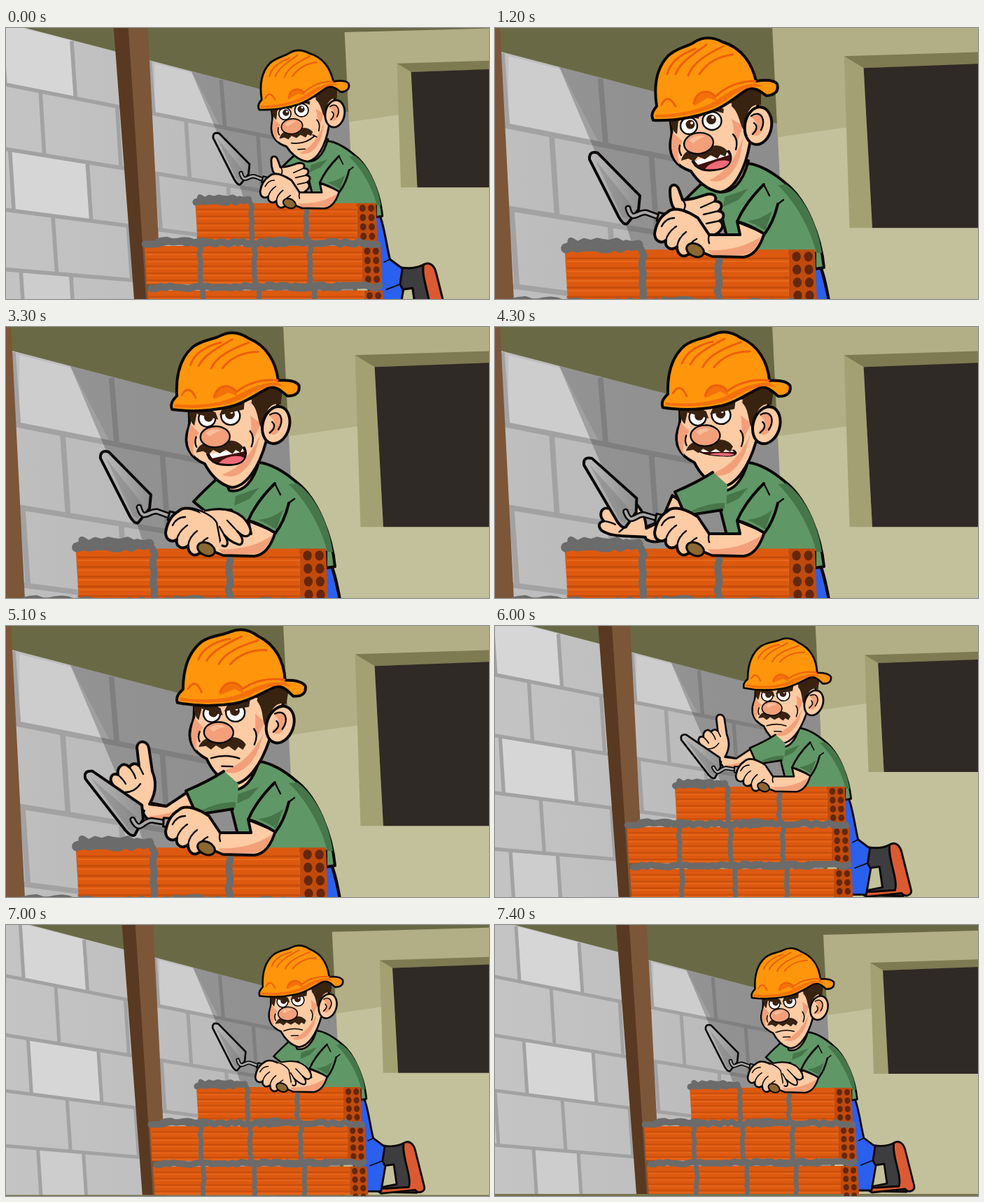
Write an HTML page that moves like this. It is 690 px wide and 388 px high and loops after 7500 ms.

```html
<!DOCTYPE html>
<html lang="en">
<head>
<meta charset="utf-8">
<title>Bricklayer</title>
<style>
html, body { margin: 0; width: 100%; height: 100%; overflow: hidden; background: #696a45; }
svg { display: block; width: 100vw; height: 100vh; }
.ink { stroke: #0b0807; stroke-width: 4; stroke-linejoin: round; stroke-linecap: round; }
.line { fill: none; stroke: #0b0807; stroke-width: 2.4; stroke-linecap: round; stroke-linejoin: round; }
.thin { stroke-width: 2.4; }
.skin { fill: #fdcba4; }
.tan { fill: #f3a07a; }
.shirt { fill: #609767; }
.fold { fill: #467649; }
.hair { fill: #382210; }
.mortar { fill: none; stroke: #6b6b6b; stroke-linecap: round; stroke-linejoin: round; }
</style>
</head>
<body>
<svg viewBox="0 0 690 388" preserveAspectRatio="none">
<defs>
  <linearGradient id="blocks"><stop stop-color="#c6c6c6"/><stop offset=".5" stop-color="#bfbfc0"/><stop offset="1" stop-color="#b4b4b5"/></linearGradient>
  <linearGradient id="steel"><stop stop-color="#bcbcbc"/><stop offset="1" stop-color="#8f8f8f"/></linearGradient>
</defs>
<g id="camera">
  <path fill="#696a45" d="M-100-100H900V500H-100z"/>

  <!-- block wall -->
  <path fill="url(#blocks)" d="M-60-23L480 118V420H-60z"/>
  <path fill="#d6d6d7" d="M31 2L120 25L126 97L36 80zM42 167L139 182L144 257L47 242z"/>
  <path fill="#cdcdce" d="M55 322L118 327L122 388H58zM226 54L274 66L310 135L226 118z"/>
  <path id="grout" fill="none" stroke="#a2a2a3" stroke-width="5"/>
  <path fill="#000" opacity=".22" d="M273 64L480 118V388H390L335 211z"/>

  <!-- front wall and window -->
  <path fill="#b2ae86" d="M469 14L800 5V400H488z"/>
  <path fill="#c3c19b" d="M475 129L537 120L800 90V400H488z"/>
  <path fill="#b2ae86" d="M537 50H800V118L537 120z"/>
  <path fill="#a3a074" d="M536 54L554 65L562 213H541z"/>
  <path fill="#7e7a51" d="M536 54L800 46V57L554 65z"/>
  <path fill="#2f2a25" d="M554 65L800 56V213H562z"/>
  <path fill="#77734f" d="M-60 385H800V430H-60z"/>

  <!-- post -->
  <path fill="#593922" d="M171-30L173 0L202 385H220L192 0L190-30z"/>
  <path fill="#7c5638" d="M190-30L216-30L217 0L231 277L236 385H217z"/>

  <!-- legs -->
  <g stroke="#0b0807" stroke-width="2.8" stroke-linejoin="round">
    <path fill="#3d3d40" d="M530 312C545 318 558 318 570 312L582 318L597 374L588 382L535 381L540 374L560 370L556 342L534 345z"/>
    <path fill="#dc5a32" d="M570 312C578 307 584 314 586 322L599 374C600 381 590 384 586 378L538 383C533 379 538 375 545 376L577 374C582 360 566 328 570 312z"/>
    <path fill="#2a60ee" d="M500 240L513 246C520 262 522 285 527 305L543 317L540 337L544 345L538 380H500z"/>
    <path fill="none" stroke-width="1.6" d="M527 305L519 309M540 337L522 344"/>
  </g>

  <g transform="translate(213.7 28) scale(.6462)">
    <!-- torso -->
    <path class="shirt ink" d="M312 207C298 221 282 234 268 250L285 264L322 262L337 322L457 322V345L470 343C466 300 445 245 415 222C395 205 378 196 362 194z"/>
    <path class="fold" d="M404 225C432 252 452 292 459 322H467C461 280 440 240 416 224zM328 242L362 230L348 246L326 256z"/>
    <path class="skin ink" d="M305 200L319 234C338 238 354 222 362 190z"/>

    <!-- head -->
    <g id="head">
      <path class="skin ink" d="M250 128C252 145 254 150 251 160C247 182 258 198 280 205C287 216 302 233 322 235C342 232 358 202 364 165L378 98L300 112z"/>
      <path class="tan" d="M254 150C250 168 252 186 264 196C259 182 262 168 268 162zM306 218C322 224 340 214 350 184L355 156C346 178 336 204 306 218zM338 130C342 145 340 152 346 164L354 140z"/>
      <path class="hair" d="M338 98L380 82L380 110C366 108 358 118 357 148C349 140 350 122 338 112zM250 130L262 132L260 152C254 148 251 140 250 130z"/>
      <ellipse class="skin ink" cx="376" cy="140" rx="19" ry="27" transform="rotate(10 376 140)"/>
      <path class="tan" d="M366 128C378 118 388 130 382 146C378 156 370 156 366 150C376 142 376 134 366 128z"/>
      <path class="line" d="M366 126C380 116 388 132 380 146M370 136Q378 142 368 152M340 152Q348 160 344 174M264 168Q262 176 266 182"/>
      <ellipse class="ink thin" fill="#fff" cx="277" cy="140" rx="12" ry="12"/>
      <ellipse class="ink thin" fill="#fff" cx="310" cy="133" rx="13.5" ry="13"/>
      <g fill="#3a2010"><circle cx="279" cy="138" r="6.5"/><circle cx="309" cy="131" r="7"/></g>
      <g fill="#fff"><circle cx="281" cy="136" r="2"/><circle cx="311" cy="128" r="2"/></g>
      <path id="calm" class="hair" d="M260 136Q270 124 291 130L292 125Q272 119 260 129zM295 124Q308 115 326 122L327 116Q308 108 294 118z"/>
      <path id="angry" class="hair" d="M260 124L288 130L293 140L262 135zM294 134L298 122L328 110L328 122z"/>
      <g id="talk">
        <path class="ink" style="stroke-width:2.6" fill="#40100d" d="M282 191Q310 190 334 176C341 187 336 199 322 202Q298 208 286 197z"/>
        <path fill="#ef6a78" d="M300 202C308 191 326 187 335 191C333 199 322 203 300 202z"/>
        <path fill="#fff" d="M285 190L332 178L334 182L290 196z"/>
      </g>
      <path id="smirk" class="line" d="M290 198Q316 202 336 184M332 182L340 186M303 211L317 210"/>
      <path id="frown" class="line" d="M286 203Q306 193 326 197M303 212L318 210"/>
      <path class="hair" d="M266 190C268 178 280 170 295 174C310 166 324 166 332 176L329 184L322 181L318 187L308 182L300 188L290 184L284 191L276 187z"/>
      <ellipse class="tan ink thin" cx="291" cy="165" rx="21" ry="15" transform="rotate(-8 291 165)"/>
      <path fill="#fbbd99" d="M277 161Q285 152 300 155Q291 158 283 165z"/>
      <path class="ink" fill="#ff950a" d="M226 132C222 124 226 118 231 112C226 80 232 56 247 40C260 28 275 27 285 20C298 12 312 13 325 20C352 28 367 50 373 76C385 74 398 74 403 80C406 90 400 96 388 97C380 92 374 85 362 87C345 97 328 114 305 121C280 129 250 133 226 132z"/>
      <path fill="#f4710a" d="M229 124C260 124 290 118 312 106C330 94 346 82 372 79L384 84C364 82 346 90 326 106C300 122 258 129 229 128zM284 112C286 96 298 86 312 94L317 104L304 100z"/>
      <path fill="none" stroke="#ee5f0c" stroke-width="3" stroke-linecap="round" d="M284 108C288 88 306 88 315 98C332 82 350 76 372 76M246 66C250 48 268 36 286 30M258 66C264 50 282 38 302 24M276 68C282 50 302 38 326 26M292 66C304 48 322 40 340 38M238 110Q246 92 258 112"/>
    </g>
  </g>

  <g id="bricks"></g>

  <!-- arms -->
  <g transform="translate(213.7 28) scale(.6462)">
    <g id="thumb">
      <path class="skin ink" d="M300 300C290 285 272 270 262 266C252 258 250 246 250 234C249 222 260 222 263 232L268 246C280 246 288 243 300 239C312 235 318 241 314 248C325 248 326 257 319 262C329 263 328 273 321 276C329 281 325 291 312 297z"/>
      <path class="line" d="M314 248L294 257M319 262L298 267M321 276L302 280M268 246Q274 252 270 260"/>
    </g>
    <g id="sleeve">
      <g id="raised">
        <path class="skin ink" d="M262 236L229 258L200 252L196 268C202 280 215 285 232 281L274 268z"/>
        <path class="skin ink" d="M228 258L205 255C214 240 216 225 209 208L204 174C201 163 188 163 187 174L190 200C186 196 180 196 176 202C168 193 158 202 160 213C151 209 146 219 153 228C160 240 178 250 196 264"/>
        <path class="line" d="M160 213Q168 220 171 226M176 202Q184 212 185 218M190 200L196 212M170 238Q184 238 192 226"/>
        <path class="tan" d="M203 272Q226 272 264 258L270 266Q222 286 203 272z"/>
      </g>
      <path class="shirt" d="M312 208L257 236L272 270L330 262L332 226z"/>
      <path class="fold" d="M276 266Q300 252 328 252V260z"/>
      <path class="ink" fill="none" d="M311 208C296 218 276 228 257 236L272 270L324 262"/>
    </g>
    <g id="trowel">
      <path fill="url(#steel)" class="ink" d="M135 188Q134 175 147 179L207 240L205 260L189 280Q184 283 177 271z"/>
      <path fill="#777" d="M143 188L196 255L189 274L182 271z" opacity=".4"/>
      <path class="line" d="M190 258C196 280 204 262 216 264L238 272" style="stroke-width:9"/>
      <path class="line" d="M190 258C196 280 204 262 216 264L238 272" style="stroke:#a7a7a7;stroke-width:4"/>
      <path class="ink" fill="#9b9b9b" style="stroke-width:3" d="M234 264L250 268L246 282L231 276z"/>
    </g>
    <path class="skin ink" d="M346 277L350 296L306 296L290 272C275 262 256 254 246 264C236 270 230 282 228 294C228 306 238 309 244 304C242 314 252 320 260 313C260 324 268 330 276 324L298 322L310 327L355 328C372 326 380 310 385 293z"/>
    <path class="tan" d="M304 318Q346 320 378 300L381 297C376 312 368 324 354 325H310z"/>
    <path class="line" d="M244 304Q247 292 259 284M260 313Q262 300 273 292M276 322Q276 308 288 302M238 284Q244 272 256 272M306 296Q304 302 306 308"/>
    <ellipse cx="286" cy="318" rx="13" ry="9" transform="rotate(25 286 318)" fill="#8b6831" class="ink" style="stroke-width:3"/>
    <g id="crossed">
      <path class="skin" d="M276 264C300 258 325 260 338 272C346 280 353 292 347 298C342 302 336 298 331 293C341 303 339 314 331 311C322 308 318 304 312 298C319 308 317 317 309 313L296 293z"/>
      <path class="line" style="stroke-width:3.2" d="M284 263C306 258 325 261 338 272C346 280 353 292 347 298C342 302 336 298 331 293C341 303 339 314 331 311C322 308 318 304 312 298C319 308 317 317 309 313"/>
      <path class="line" d="M331 293L316 277M312 298L305 286M262 259C280 262 296 271 301 280L306 306"/>
    </g>
    <path class="shirt ink" d="M384 224C368 240 354 258 346 277Q364 282 385 295Q398 278 404 252"/>
    <path class="fold" d="M362 276Q380 274 396 262L386 290Q372 281 362 277z"/>
    <path class="line" d="M404 252L412 246M384 224L392 240"/>
  </g>
</g>
</svg>
<script>
const $ = id => document.getElementById(id);

// Courses of the block wall: height at x = 0 and slope.
const courses = [[-7, .26], [74, .198], [158, .163], [237, .13], [315, .085], [393, .06]];
const courseY = (i, x) => courses[i][0] + courses[i][1] * x;
const joints = [[-62, 30, 120, 220, 311, 400], [-15, 80, 178, 266, 358], [-55, 41, 140, 229, 320],
  [0, 96, 192, 285], [-40, 55, 119, 210, 300]];
let grout = '';
joints.forEach((xs, i) => {
  if (i) grout += `M-60 ${courseY(i, -60)}L480 ${courseY(i, 480)}`;
  for (const x of xs) grout += `M${x} ${courseY(i, x) + (i ? 0 : 1)}L${x + 5} ${courseY(i + 1, x + 5)}`;
});
$('grout').setAttribute('d', grout);

let seed = 7;
const rand = () => (seed = seed * 16807 % 2147483647) / 2147483647;

// Uneven line of mortar.
function mortar(x1, y1, x2, y2, width, rough) {
  const n = Math.ceil(Math.hypot(x2 - x1, y2 - y1) / 6);
  let d = '';
  for (let i = 0; i <= n; i++) {
    const jx = x1 === x2 ? (rand() - .5) * rough : 0, jy = x1 === x2 ? 0 : (rand() - .5) * rough;
    d += `${i ? 'L' : 'M'}${x1 + (x2 - x1) * i / n + jx} ${y1 + (y2 - y1) * i / n + jy}`;
  }
  return `<path class="mortar" stroke-width="${width}" d="${d}"/>`;
}

function brickRow(left, right, top, bottom, seams) {
  const face = right - 24;
  let s = `<path fill="#dd590f" d="M${left} ${top}H${face}V${bottom}H${left + 3}z"/>`
    + `<path fill="#c04a0c" d="M${face} ${top}H${right}L${right + 2} ${bottom}H${face}z"/>`;
  for (let y = top + 8; y < bottom - 3; y += 9)
    s += `<path stroke="#c44d0c" stroke-width="1.6" d="M${left + 2} ${y}H${face}"/>`
      + `<path stroke="#ea6d20" stroke-width="1" d="M${left + 2} ${y + 3}H${face}"/>`;
  for (let i = 0; i < 4; i++)
    for (const x of [face + 7, face + 18])
      s += `<ellipse cx="${x + i * .4}" cy="${top + 6.5 + i * 12}" rx="4" ry="4.6" fill="#64270c"/>`;
  for (const x of seams) s += mortar(x, top, x, bottom, 6.5, 2.5);
  return s;
}
$('bricks').innerHTML =
  brickRow(278, 509, 233, 282, [350, 420]) + brickRow(213, 515, 288, 337, [284, 354, 425])
  + brickRow(217, 518, 345, 385, [288, 360, 430])
  + mortar(279, 231, 346, 230, 9, 4) + mortar(284, 227, 338, 227, 7, 4)
  + mortar(214, 284, 511, 284, 9, 4) + mortar(230, 280, 300, 281, 6, 4) + mortar(370, 280, 410, 280, 6, 4)
  + mortar(222, 341, 514, 340, 9, 4) + mortar(370, 338, 460, 338, 6, 4);

const ramp = (t, a, b) => Math.max(0, Math.min(1, (t - a) / (b - a)));
const show = (id, on) => $(id).style.display = on ? '' : 'none';
const place = (id, value) => $(id).setAttribute('transform', value);

function view(t) {
  if (t < 700) {
    const k = t / 1000 * .035;
    return [1.117 + k, -40.2 - 400 * k, -9.6 - 150 * k];
  }
  if (t < 5700) return [1.5475, -330.7, -43.3];
  const k = (7400 - t) / 1400;
  return [1 + .0525 * k, -35.9 * k, -15.3 * k];
}

function draw(t) {
  const [zoom, x, y] = view(t);
  place('camera', `translate(${x} ${y}) scale(${zoom})`);

  const raise = ramp(t, 4200, 4500) - ramp(t, 6200, 6500);
  const tilt = 5.5 * ramp(t, 2500, 2800) + 3.5 * raise;
  place('head', `translate(${tilt / 3} ${-tilt * .8}) rotate(${tilt} 330 225)`);
  place('trowel', `rotate(${-11 * raise} 285 315)`);
  place('raised', `rotate(${-50 * (1 - raise)} 266 253)`);
  show('sleeve', raise > 0);
  show('thumb', t < 2500);
  show('crossed', t >= 2500 && raise <= 0);

  const talking = t >= 600 && t < 4800;
  const open = .65 + .35 * Math.cos((t - 1200) / 420 * 2 * Math.PI);
  place('talk', `translate(0 ${184 * (1 - open)}) scale(1 ${open})`);
  show('talk', talking);
  show('smirk', t < 600);
  show('frown', t >= 4800);
  show('calm', t < 2500);
  show('angry', t >= 2500);
}

const start = performance.now();
function tick() {
  draw(Math.floor((performance.now() - start) % 7500 / 100) * 100);
  requestAnimationFrame(tick);
}
tick();
</script>
</body>
</html>
```
